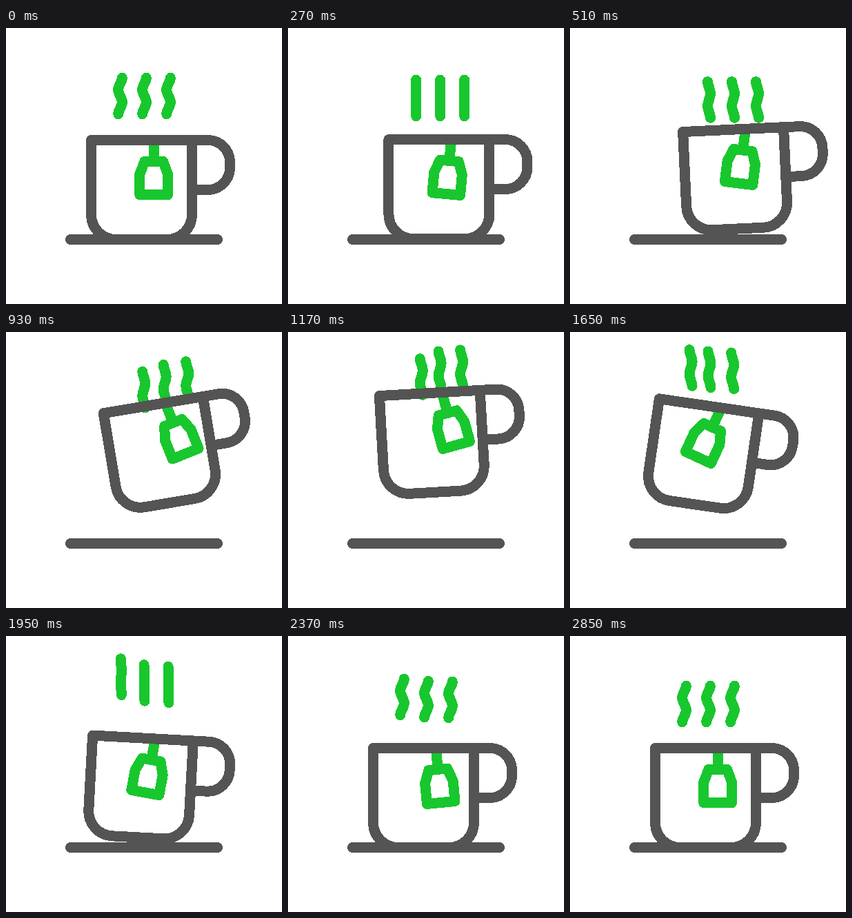
An HTML page that plays this animation: 400x400 px, repeating every 4910 ms.

```html
<!DOCTYPE html>
<html lang="en">
<head>
<meta charset="utf-8">
<title>Tea cup</title>
<style>
  html, body { margin: 0; width: 100%; height: 100%; overflow: hidden; background: #fff; }
  svg { display: block; width: 100%; height: 100%; }
  path {
    fill: none; stroke-width: 15; stroke-linecap: round; stroke-linejoin: round;
    shape-rendering: crispEdges;
  }
  .green path { stroke: #18c72d; }
  .gray { stroke: #545454; }
</style>
</head>
<body>
<svg viewBox="0 0 400 400">
  <g class="green" id="steam"><path/><path/><path/></g>
  <path class="gray" d="M93.5 306.5H306.5"/>
  <g id="cup">
    <g class="green" id="bag">
      <path d="M214.3 162.5V190"/>
      <path d="M200.8 193.5H227.8L234.5 212V241.8H193.8V212Z"/>
    </g>
    <path class="gray" d="M269.5 162.5H123.5V270.5a36 36 0 0 0 36 36H233.5a36 36 0 0 0 36 -36V162.5H292.5a32 32 0 0 1 32 32V202.5a32 32 0 0 1 -32 32H270"/>
  </g>
</svg>
<script>
const LOOP = 4910, STEP = 30, LAST = 2850;

// Smooth rise from 0 to 1 between two times.
function ease(from, to, t) {
  const u = Math.min(1, Math.max(0, (t - from) / (to - from)));
  return u * u * (3 - 2 * u);
}

// Eases from 0 through each [time, value] in turn.
function glide(t, from, ...stops) {
  let value = 0, last = 0;
  for (const [time, next] of stops) {
    value += (next - last) * ease(from, time, t);
    from = time;
    last = next;
  }
  return value;
}

const cup = document.getElementById('cup');
const bag = document.getElementById('bag');
const strands = document.querySelectorAll('#steam path');

function drawCup(t) {
  const x = glide(t, 0, [530, 43.6], [1620, -5.3], [2170, 0]);
  const y = -76 * (ease(200, 1270, t) - ease(1385, 2170, t));
  const tilt = glide(t, 350, [830, -10.3], [1640, 8.3], [2170, 0]);
  const swing = glide(t, 0, [510, 9.6], [1050, -15.5], [1650, 16.5], [2330, -5.8], [2660, 1.5], [LAST, 0]);
  cup.setAttribute('transform', `translate(${x} ${y}) rotate(${tilt} 196.5 234.5)`);
  bag.setAttribute('transform', `rotate(${swing} 214.3 162.5)`);
}

// The strands trail the cup, the leftmost the most, and bend the other way while it flies.
function drawSteam(t) {
  const a = 2.8 - 4.8 * (ease(0, 480, t) - ease(1700, 2370, t));
  const d = `M${a} -26.3C${a} -20 ${-a} -16 ${-a} -9S${a} 2 ${a} 9S${-a} 20 ${-a} 26.3`;
  strands.forEach((strand, i) => {
    const lag = 75 * (2 - i) ** 2;
    const x = 36 * (ease(0, 500, t) - ease(570 + 0.6 * lag, 1690 + 1.4 * lag, t));
    const y = glide(t, 0, [510, 5.5], [1190 + lag, -46.5]) + 46.5 * ease(1420 + lag, 2650, t);
    strand.setAttribute('d', d);
    strand.setAttribute('transform', `translate(${165.5 + 35 * i + x} ${98.5 + y})`);
  });
}

const start = performance.now();
function tick() {
  const elapsed = (performance.now() - start) % LOOP;
  const t = Math.min(LAST, Math.floor(elapsed / STEP) * STEP);
  drawCup(t);
  drawSteam(t);
  requestAnimationFrame(tick);
}
tick();
</script>
</body>
</html>
```
